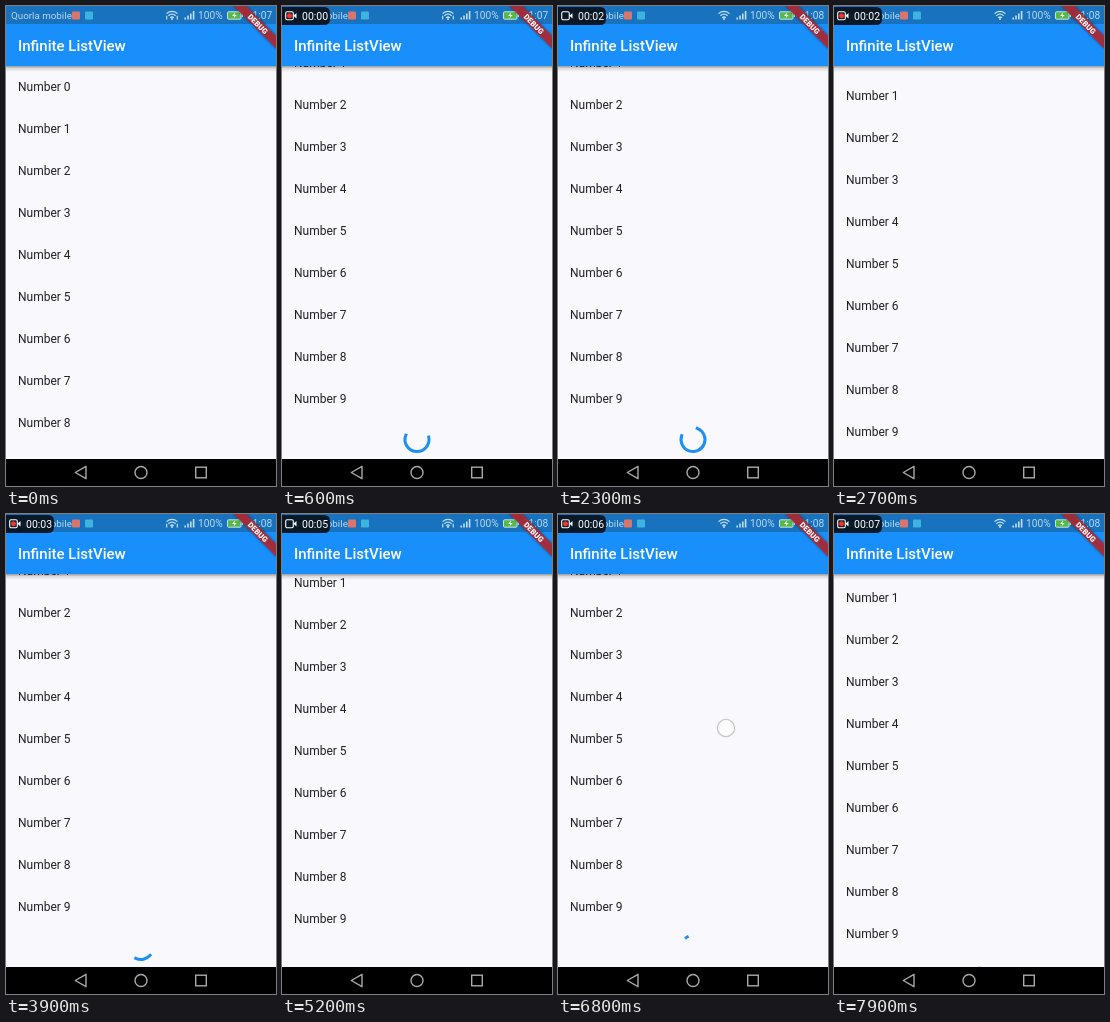
An HTML page for the animation above (8000 ms loop, 270x480 px).

```html
<!DOCTYPE html>
<html lang="en">
<head>
<meta charset="utf-8">
<title>Infinite list</title>
<style>
  html, body { margin: 0; width: 100%; height: 100%; overflow: hidden; background: #000; }
  svg { display: block; width: 270px; height: 480px; font-family: Roboto, sans-serif; }
  .status { font-size: 10.2px; fill: #b9d8f2; }
  .rows { font-size: 12px; fill: #212124; }
</style>
</head>
<body>
<svg viewBox="0 0 270 480" xmlns="http://www.w3.org/2000/svg">
  <defs>
    <clipPath id="view"><rect y="60" width="270" height="393"/></clipPath>
    <linearGradient id="shade" x1="0" y1="0" x2="0" y2="1">
      <stop offset="0" stop-color="#000" stop-opacity=".38"/>
      <stop offset=".4" stop-color="#000" stop-opacity=".13"/>
      <stop offset="1" stop-color="#000" stop-opacity="0"/>
    </linearGradient>
    <filter id="soft" x="-30%" y="-60%" width="160%" height="220%"><feGaussianBlur stdDeviation="1.8"/></filter>
  </defs>

  <rect width="270" height="453" fill="#f9f8fc"/>
  <g clip-path="url(#view)">
    <g id="list" class="rows">
      <path id="spinner" fill="none" stroke="#1e90f5" stroke-width="3" stroke-linecap="square"/>
    </g>
  </g>

  <rect y="60" width="270" height="6" fill="url(#shade)"/>
  <rect y="18" width="270" height="42" fill="#188ffa"/>
  <rect width="270" height="18" fill="#1872bd"/>
  <text x="12" y="45" font-size="15" font-weight="500" fill="#fff">Infinite ListView</text>

  <g class="status">
    <text x="5" y="13.3" font-size="9.8">Quorla mobile</text>
    <rect x="66" y="5.5" width="8" height="8" rx="1" fill="#d9756c"/>
    <rect x="79" y="5.5" width="8" height="8" rx="1" fill="#3db4e0"/>
    <g fill="none" stroke="#c4def4" stroke-width="1.2">
      <path d="M160.5 7.6Q166 3 171.500 7.600M162.300 9.800Q166 6.600 169.700 9.800M164.200 11.800Q166 10.200 167.800 11.800"/>
      <path id="traffic" d="M160.700 13.500V9.800M171.300 9.800V13.500"/>
      <path d="M179.200 13.500V11.500M182 13.500V9.500M184.800 13.500V7.500M187.600 13.500V5" stroke-width="1.6"/>
    </g>
    <circle cx="166" cy="13" r="1" fill="#c4def4"/>
    <text x="192" y="13.300">100%</text>
    <rect x="221.500" y="5.800" width="13.500" height="7.400" rx="1" fill="#55b948" stroke="#c4def4"/>
    <rect x="235.500" y="8" width="1.500" height="3" fill="#c4def4"/>
    <path d="M229 6.500L226 10H228.200L227.500 12.500L230.700 9H228.500Z" fill="#e9f6e6"/>
    <text id="clock" x="240.800" y="13.300"></text>
  </g>

  <g transform="translate(270 0) rotate(45)">
    <rect x="-30" y="21" width="60" height="9" fill="#000" opacity=".4" filter="url(#soft)"/>
    <rect x="-30" y="21" width="60" height="9" fill="#b02a34" opacity=".9"/>
    <text y="28.300" font-size="7.650" font-weight="900" fill="#fff" text-anchor="middle">DEBUG</text>
  </g>

  <g id="recorder">
    <path d="M0 1H42Q48 1 48 7V13Q48 19 42 19H0Z" fill="#08121d" opacity=".93"/>
    <rect x="3.700" y="5.700" width="7.600" height="8" rx="1.500" fill="none" stroke="#fff" stroke-width="1.100"/>
    <path d="M11.500 9.700L14.500 7V12.400Z" fill="#fff"/>
    <circle id="lamp" cx="7.500" cy="9.700" r="2.500" fill="#f0362c"/>
    <text id="timer" x="20" y="13.600" font-size="10.500" fill="#fff"></text>
  </g>

  <circle id="touch" r="8.600" fill="#fff" fill-opacity=".75" stroke="#c6c6cc" stroke-width="1.300"/>

  <rect y="453" width="270" height="27" fill="#000"/>
  <g fill="none" stroke="#a9a9a9" stroke-width="1.400">
    <path d="M80 460.300V472.700L69.300 466.500Z" stroke-linejoin="round"/>
    <circle cx="135" cy="466.500" r="6"/>
    <rect x="189.700" y="461.200" width="10.600" height="10.600"/>
  </g>
</svg>
<script>
const LOOP = 8000;
const $ = id => document.getElementById(id);
const list = $('list'), spinner = $('spinner'), touch = $('touch');
const clamp = v => Math.min(1, Math.max(0, v));

function bezier(x1, y1, x2, y2) {
  const at = (a, b, s) => 3 * a * s * (1 - s) ** 2 + 3 * b * s * s * (1 - s) + s ** 3;
  return x => {
    if (x <= 0 || x >= 1) return clamp(x);
    let lo = 0, hi = 1;
    for (let i = 0; i < 24; i++) {
      const mid = (lo + hi) / 2;
      if (at(x1, x2, mid) < x) lo = mid; else hi = mid;
    }
    return at(y1, y2, lo);
  };
}
const easeOut = bezier(0, 0, .58, 1);
const easeInOut = bezier(.42, 0, .58, 1);
const fastOutSlowIn = bezier(.4, 0, .2, 1);

// start, end, scroll offset reached, easing
const scrolls = [
  [60, 330, 66, easeOut],
  [2340, 2840, 28.5, easeOut],
  [3050, 3160, 66, easeOut],
  [5096, 5596, 28.5, easeOut],
  [5850, 6020, 66, easeOut],
  [6880, 7450, 39, easeInOut]
];
// start, end, x, y from, y to
const touches = [
  [40, 300, 211, 330, 220],
  [3040, 3200, 211, 320, 240],
  [5840, 6040, 205, 320, 240],
  [6740, 7500, 168, 214, 254]
];
const loading = [[330, 2340], [3130, 5096], [6000, LOOP]];
const traffic = [[0, 2300], [3300, 5400]];
const during = (spans, t) => spans.find(([a, b]) => t >= a && t < b);
const show = (el, on) => el.setAttribute('visibility', on ? 'visible' : 'hidden');

for (let i = 0; i < 10; i++) {
  const row = document.createElementNS('http://www.w3.org/2000/svg', 'text');
  row.setAttribute('x', 12);
  row.setAttribute('y', 85.2 + 42 * i);
  row.textContent = 'Number ' + i;
  list.append(row);
}

function scrollAt(t) {
  let pos = 0;
  for (const [start, end, to, ease] of scrolls) {
    if (t < start) break;
    pos += (to - pos) * ease(clamp((t - start) / (end - start)));
  }
  return pos;
}

// Indeterminate ring: the head runs ahead, then the tail catches up.
function ringPath(t) {
  const turns = (t - 1500) / 1333.2 + .93;
  const step = Math.floor(turns), p = turns - step;
  const head = 270 * fastOutSlowIn(clamp(p * 2));
  const tail = 270 * fastOutSlowIn(clamp(p * 2 - 1));
  const base = -90 + 306 * p - 144 * step;
  const sweep = Math.max(head - tail, .5);
  const point = deg => {
    const a = deg * Math.PI / 180;
    return (135 + 12 * Math.cos(a)).toFixed(3) + ' ' + (499.5 + 12 * Math.sin(a)).toFixed(3);
  };
  return `M${point(base + tail)}A12 12 0 ${sweep > 180 ? 1 : 0} 1 ${point(base + tail + sweep)}`;
}

function draw(t) {
  list.setAttribute('transform', `translate(0 ${-scrollAt(t)})`);
  show(spinner, during(loading, t));
  spinner.setAttribute('d', ringPath(t));

  const drag = during(touches, t);
  show(touch, drag);
  if (drag) {
    const [start, end, x, from, to] = drag;
    touch.setAttribute('cx', x);
    touch.setAttribute('cy', from + (to - from) * easeInOut(clamp((t - start - 60) / (end - start - 60))));
  }

  const run = Math.max(0, t - 100);
  show($('recorder'), t >= 100);
  show($('lamp'), t >= 100 && run % 1000 >= 500);
  $('timer').textContent = '00:0' + Math.floor(run / 1000);
  $('clock').textContent = t < 700 ? '21:07' : '21:08';
  show($('traffic'), during(traffic, t));
}

const began = performance.now();
function tick() {
  draw((performance.now() - began) % LOOP);
  requestAnimationFrame(tick);
}
draw(0);
requestAnimationFrame(tick);
</script>
</body>
</html>
```
